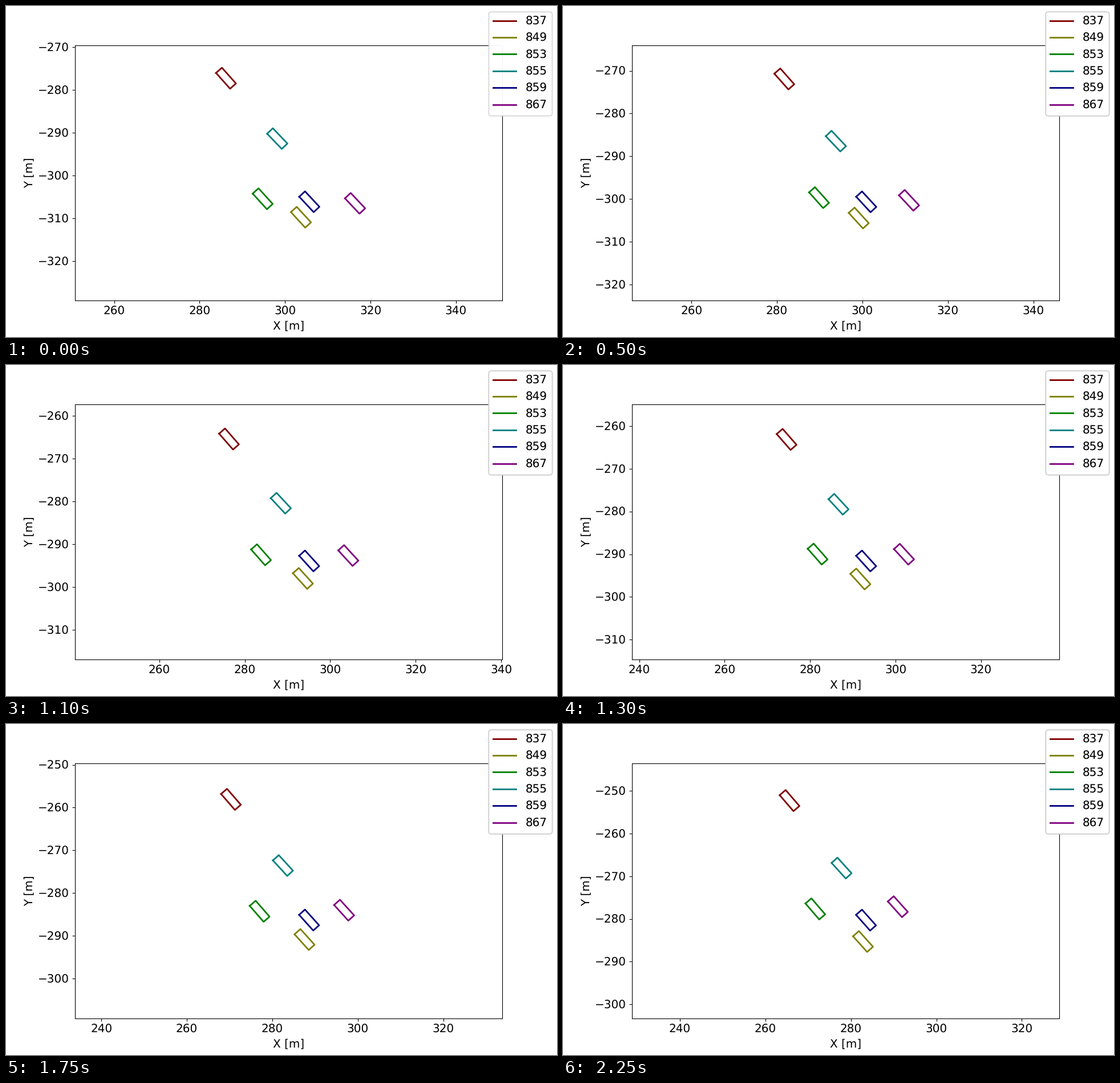
A matplotlib script for the animation above (2300 ms loop, 966 by 580 pixels).

```python
import numpy as np
import matplotlib.pyplot as plt
from matplotlib.animation import FuncAnimation
from matplotlib.ticker import MultipleLocator

FRAMES, INTERVAL = 46, 50
WIDTH, HEIGHT, DPI = 966, 580, 100
HALF_VIEW = 50
CAR_LENGTH, CAR_WIDTH = 4.94, 1.84
DRIFT = np.radians(1.7)  # bodies point slightly off their course
BEND = np.array([0.89, -1.62])  # lag of an accelerating car behind uniform motion
LEGEND_LAYERS = 6

plt.rcParams.update({
    "font.family": "DejaVu Sans",
    "font.size": 14.4,
    "text.hinting": "no_hinting",
    "lines.linewidth": 2,
})

# Colour, first and last position in metres, share of the acceleration.
CARS = {
    "837": ("maroon", (286.17, -277.22), (265.64, -252.32), 0.8),
    "849": ("olive", (303.71, -309.73), (282.83, -285.28), 0.5),
    "853": ("green", (294.76, -305.41), (271.67, -277.66), 1.5),
    "855": ("teal", (298.17, -291.34), (277.82, -268.11), 1.0),
    "859": ("navy", (305.67, -306.11), (283.54, -280.28), 1.0),
    "867": ("purple", (316.37, -306.48), (290.98, -277.14), 1.2),
}


def car_pose(start, end, gain, u):
    """Centre and heading of a car at progress u along its path."""
    start, end = np.array(start), np.array(end)
    centre = start + (end - start) * u + gain * BEND * u * (1 - u)
    vx, vy = end - start + gain * BEND * (1 - 2 * u)
    return centre, np.arctan2(vy, vx) + DRIFT


def car_outline(centre, heading):
    along = CAR_LENGTH / 2 * np.array([1, 1, -1, -1, 1])
    across = CAR_WIDTH / 2 * np.array([1, -1, -1, 1, 1])
    c, s = np.cos(heading), np.sin(heading)
    return (centre[0] + along * c - across * s,
            centre[1] + along * s + across * c)


fig, ax = plt.subplots(figsize=(WIDTH / DPI, HEIGHT / DPI), dpi=DPI)
fig.subplots_adjust(left=0.125, right=870 / WIDTH, bottom=0.11, top=511 / HEIGHT)
ax.set_xlabel("X [m]")
ax.set_ylabel("Y [m]")
ax.xaxis.set_major_locator(MultipleLocator(20))
ax.yaxis.set_major_locator(MultipleLocator(10))
box = ax.get_window_extent()
half_size = np.array([HALF_VIEW, HALF_VIEW * box.height / box.width])

lines = {name: ax.plot([], [], color=car[0], label=name)[0]
         for name, car in CARS.items()}

# Translucent legends pile up over the first frames.
legends = [fig.legend(loc="upper right", borderaxespad=0.475)
           for _ in range(LEGEND_LAYERS)]


def update(frame):
    u = frame / (FRAMES - 1)
    poses = {name: car_pose(*car[1:], u) for name, car in CARS.items()}
    for name, pose in poses.items():
        lines[name].set_data(*car_outline(*pose))

    # The view follows the middle of the group.
    middle = np.mean([centre for centre, _ in poses.values()], axis=0)
    (left, bottom), (right, top) = middle - half_size, middle + half_size
    ax.set(xlim=(left, right), ylim=(bottom, top))

    for layer, legend in enumerate(legends):
        legend.set_visible(layer < frame + 2)
    return list(lines.values())


anim = FuncAnimation(fig, update, frames=FRAMES, interval=INTERVAL,
                     init_func=lambda: update(0), repeat=True, repeat_delay=0)
plt.show()
```
